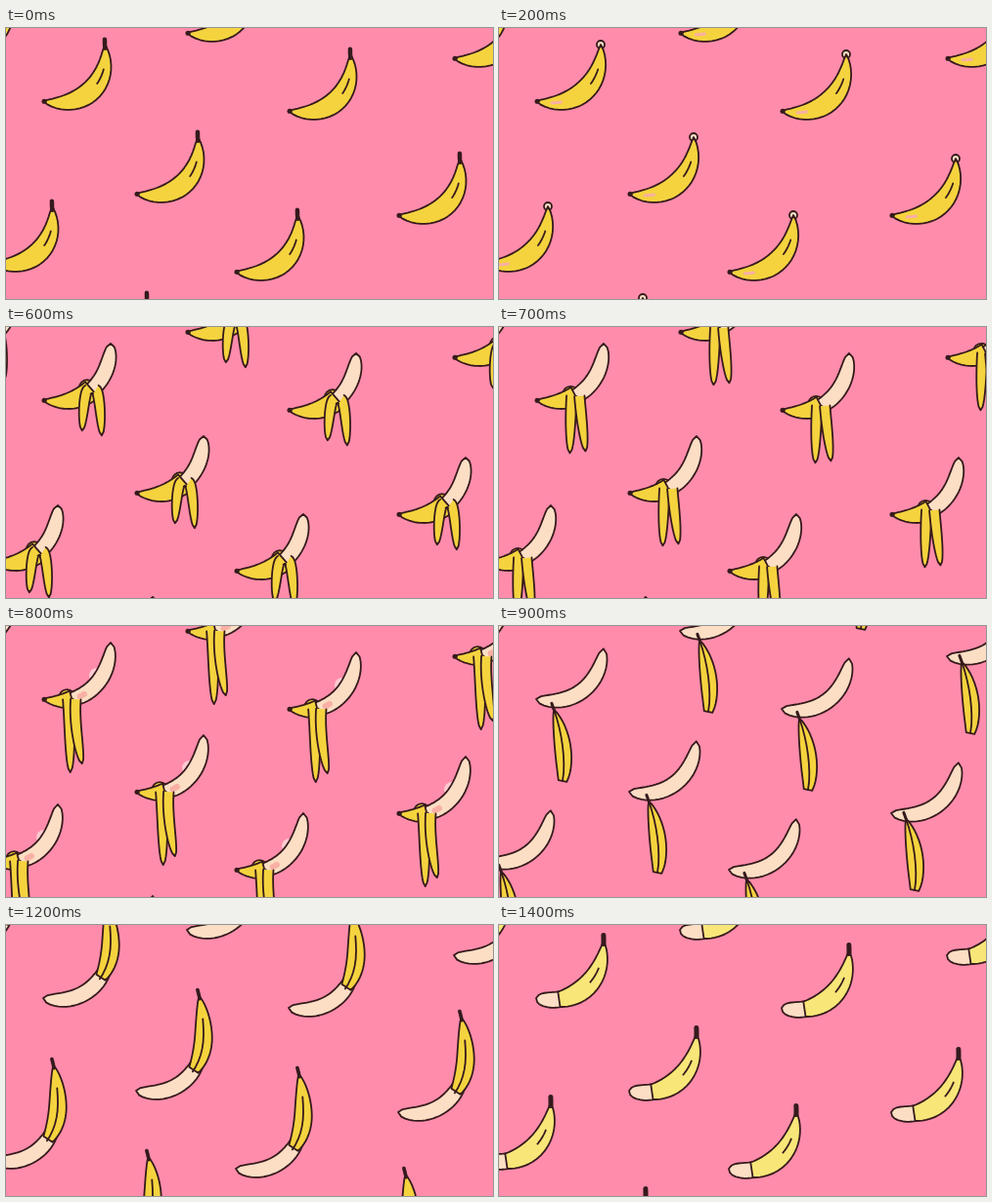
An HTML page with a canvas that plays this animation: 498 by 278 pixels, repeating every 1.5 s.

```html
<!DOCTYPE html>
<html lang="en">
<head>
<meta charset="utf-8">
<title>Peeling bananas</title>
<style>
html, body { margin: 0; width: 100%; height: 100%; overflow: hidden; background: #ff8cab; }
canvas { display: block; }
</style>
</head>
<body>
<canvas id="stage" width="498" height="278"></canvas>
<script>
const ctx = document.getElementById('stage').getContext('2d');
const STEP = 100, STEPS = 15, ROWS = 3;
const PINK = '#ff8cab', INK = '#351a1c', YELLOW = '#f5d33e', PALE = '#f8e678';
const CREAM = '#fbdec4', BLUSH = '#f9b0a4', SMEAR = '#ffcbd0';

// Falling columns of bananas: first place, then the way to the next one below.
const columns = [
  { x: -100, y: -57, dx: -53, dy: 165 },
  { x: 147, y: -70, dx: -52, dy: 165 },
  { x: 420, y: -44, dx: -57, dy: 161 },
  { x: 0, y: 0, dx: -54, dy: 166 },
  { x: 251, y: 10, dx: -54, dy: 165 }
];

const lerp = (a, b, f) => a + (b - a) * f;
const clamp01 = v => Math.max(0, Math.min(1, v));

// Middle line of a banana: t = 0 at the tip, 1 at the stem, straight on above it.
function bananaSpine(step) {
  const topX = Math.min(107, 101 + 1.5 * step), topY = 17;
  return t => {
    if (t > 1) return [topX - 50 * (t - 1) ** 2, topY - 130 * (t - 1)];
    const u = 1 - t, a = u ** 3, b = 3 * u * u * t, c = 3 * u * t * t, d = t ** 3;
    return [38 * a + 75 * b + 107 * c + topX * d, 75 * a + 84 * b + 60 * c + topY * d];
  };
}

const bend = (p, q, r) => t => [0, 1].map(i => lerp(lerp(p[i], q[i], t), lerp(q[i], r[i], t), t));

// Half widths.
const skinWidth = t => 10.5 * (4 * t * (1 - t)) ** 0.8;
const fruitWidth = s => 8 * Math.sqrt(1 - Math.abs(2 * s - 1) ** 3);
const flapWidth = s => 5.2 * Math.sqrt(1 - s ** 4);

// A band along a spine, with a half width that depends on the share s of its length.
function ribbon(spine, lo, hi, width, fill, closed = true) {
  const left = [], right = [], n = 24;
  for (let i = 0; i <= n; i++) {
    const s = i / n, t = lerp(lo, hi, s), [x, y] = spine(t);
    const [x0, y0] = spine(t - 0.01), [x1, y1] = spine(t + 0.01);
    const k = width(s) / Math.hypot(x1 - x0, y1 - y0);
    left.push([x + (y1 - y0) * k, y - (x1 - x0) * k]);
    right.unshift([x - (y1 - y0) * k, y + (x1 - x0) * k]);
  }
  ctx.beginPath();
  for (const p of [...left, ...right]) ctx.lineTo(...p);
  if (closed) ctx.closePath();
  ctx.fillStyle = fill;
  ctx.fill();
  ink(1.8);
}

function ink(width, color = INK) {
  ctx.lineWidth = width;
  ctx.strokeStyle = color;
  ctx.stroke();
}

function mark(spine, lo, hi, width, color) {
  ctx.beginPath();
  for (let i = 0; i <= 8; i++) ctx.lineTo(...spine(lerp(lo, hi, i / 8)));
  ink(width, color);
}

function disc([x, y], radius, fill) {
  ctx.beginPath();
  ctx.arc(x, y, radius, 0, 7);
  ctx.fillStyle = fill;
  ctx.fill();
}

// A strip of skin that first arches outwards, then hangs.
function flap([x, y], side, reach, step) {
  const root = [x + 4 * side, y];
  const elbow = [x + side * (26 - 3 * step), y + 11.25 * step - 65];
  const tip = [x + side * (22 - 2 * step) + Math.max(0, step - 6) * 2.2, y + reach];
  ribbon(bend(root, elbow, tip), 0, 1, flapWidth, YELLOW, false);
}

function peeling(step) {
  const spine = bananaSpine(step);
  const cut = Math.min(1, 1 - 0.12 * (step - 2)), edge = spine(cut);
  if (step === 8) disc([93, 51], 8, SMEAR);
  if (step > 4) {
    disc([edge[0] - 5, edge[1] - 2], 8, YELLOW);
    ink(1.8);
  }
  if (step > 2) ribbon(spine, cut - 0.15, 1, fruitWidth, CREAM);
  else if (step > 0) {
    disc(spine(1), 4, CREAM);
    ink(1.8);
  }
  if (step === 8) mark(spine, 0.37, 0.42, 6, BLUSH);
  ribbon(spine, 0, cut, s => skinWidth(s * cut), YELLOW);
  if (step === 1 || step === 2) mark(spine, 0.15, 0.24, 3, BLUSH);
  if (step < 4) mark(spine, 0.62, 0.78, 1.8);
  if (step < 1) mark(spine, 0.97, 1.04, 4.5);
  if (step > 2) {
    flap(edge, -1, 16.5 * step - 57, step);
    flap(edge, 1, 9.5 * step - 10, step);
  }
  disc(spine(0.01), 2.6, INK);
}

// Skin dropped from the banana above lands on the stem end and slides over the fruit.
function closing(step) {
  const spine = bananaSpine(step);
  const drop = clamp01((11 - step) / 3), slide = clamp01((step - 11) / 3);
  const lo = lerp(0.88, 0.22, slide), hi = lerp(1.45, 1, slide);
  ribbon(spine, 0, Math.min(0.95, lo + 0.2), fruitWidth, CREAM);
  ctx.translate(20 * drop, -58 * drop);
  const skin = s => lerp(0.78, 1, slide) * skinWidth(lerp(lerp(0.13, 0.22, slide), 1, s));
  ribbon(spine, lo, hi, skin, step > 12 ? PALE : YELLOW);
  mark(spine, lerp(lo, 0.6, slide), lerp(hi, 0.76, slide), 1.8);
  mark(spine, hi - 0.02, hi + 0.05, lerp(3, 5, slide));
}

function draw(now) {
  const step = Math.floor(now / STEP) % STEPS;
  ctx.fillStyle = PINK;
  ctx.fillRect(0, 0, 498, 278);
  ctx.lineCap = ctx.lineJoin = 'round';
  for (const { x, y, dx, dy } of columns) {
    for (let row = 0; row < ROWS; row++) {
      ctx.save();
      ctx.translate(x + row * dx, y + row * dy);
      if (step < 9) peeling(step);
      else closing(step);
      ctx.restore();
    }
  }
}

const start = performance.now();
function tick() {
  draw(performance.now() - start);
  requestAnimationFrame(tick);
}
tick();
</script>
</body>
</html>
```
